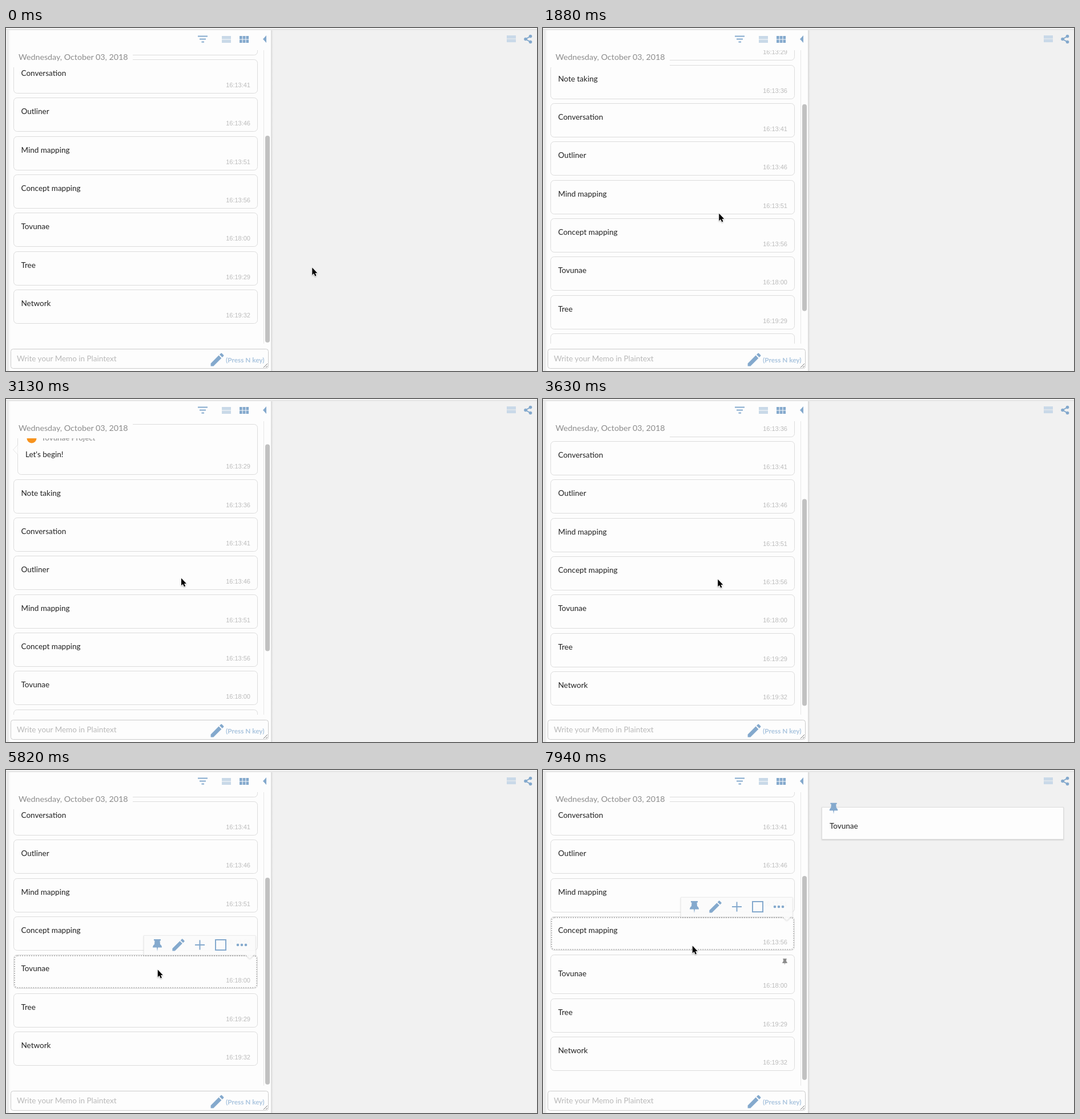
These frames come from a looping animation (930x602 px, 8000 ms). An HTML page:

```html
<!DOCTYPE html>
<html lang="en">
<head>
<meta charset="utf-8">
<title>Note board</title>
<style>
  html, body { margin: 0; width: 100%; height: 100%; overflow: hidden; background: #f1f1f1; }
  svg { display: block; width: 930px; height: 602px; font: 13.5px Lato, sans-serif; fill: #222; }
  .card { fill: #fdfdfd; stroke: #dcdcdc; }
  .time { font: 11px "Liberation Sans", sans-serif; fill: #bbb; text-anchor: end; }
  .blue { fill: #84a9cd; }
  .line { fill: none; stroke: #84a9cd; stroke-width: 2; }
  .pale { fill: #c9d9e8; }
  .date { font-size: 14.25px; fill: #8c8c8c; }
  .name { font-size: 13.2px; font-weight: bold; fill: #a3a3a3; }
  .hint { fill: #b9b9b9; }
  .key { font-size: 11.8px; font-weight: bold; fill: #a9c4de; }
</style>
</head>
<body>
<svg viewBox="0 0 930 602">
  <defs>
    <clipPath id="listClip"><rect x="8" y="39" width="443" height="515"/></clipPath>
    <linearGradient id="edge">
      <stop offset="0" stop-color="#d8d8d8"/><stop offset="1" stop-color="#f1f1f1"/>
    </linearGradient>
    <filter id="soft" x="-20%" y="-20%" width="140%" height="150%">
      <feDropShadow dx="0" dy="1" stdDeviation="1" flood-opacity=".16"/>
    </filter>
    <filter id="drop" x="-50%" y="-50%" width="200%" height="200%">
      <feDropShadow dx="0" dy="1" stdDeviation=".9" flood-opacity=".35"/>
    </filter>
    <path id="pin" d="M-6-10H6V-7.5H4.5L5-1Q8 1 8 4.5H1L0 11L-1 4.5H-8Q-8 1-5-1L-4.5-7.5H-6Z"/>
    <path id="pencil" d="M-9 5.25V9h3.75L5.81-2.06 2.06-5.81ZM8.71-4.96q.7-.7 0-1.41L6.37-8.71q-.7-.7-1.41 0L3.13-6.88 6.88-3.13Z"/>
    <path id="rows" d="M-8-6H8V-.6H-8ZM-8 .6H8V6H-8Z"/>
  </defs>

  <rect width="930" height="602" fill="#f1f1f1"/>
  <rect x="3" y="3" width="461" height="599" fill="#f6f6f6"/>
  <rect x="3" y="3" width="1" height="599" fill="#dedede"/>
  <rect x="7" y="3" width="457" height="599" fill="#fdfdfd"/>
  <rect x="464" y="3" width="4" height="599" fill="url(#edge)"/>
  <rect width="930" height="2" fill="#f8f8f8"/>
  <rect y="2" width="930" height="1" fill="#dcdcdc"/>
  <rect y="3" width="930" height="1" fill="#ebebeb"/>

  <path class="line" d="M336 14.500H353M339 19.500H350M342.500 24.500H347"/>
  <use href="#rows" class="pale" x="386" y="20"/>
  <path class="blue" d="M409 14h4.700v5.400h-4.700zm5.700 0h4.700v5.400h-4.700zm5.700 0h4.700v5.400h-4.700zM409 20.600h4.700v5.400h-4.700zm5.700 0h4.700v5.400h-4.700zm5.700 0h4.700v5.400h-4.700z"/>
  <path class="blue" d="M456 13V26L450 19.500Z"/>
  <use href="#rows" class="pale" x="885" y="19"/>
  <path class="line" stroke-width="1.500" d="M918.500 14.500 910 19.500 918.500 24.500"/>
  <g class="blue"><circle cx="918.500" cy="14.500" r="2.800"/><circle cx="910" cy="19.500" r="2.800"/><circle cx="918.500" cy="24.500" r="2.800"/></g>

  <g clip-path="url(#listClip)">
    <g id="list">
      <rect class="card" x="20.500" y="98.500" width="420" height="88" rx="6"/>
      <path class="card" d="M20.500 134.500 12.500 143 20.500 151.500" stroke-opacity=".7"/>
      <circle cx="45" cy="123" r="8.500" fill="#f7931e"/>
      <text class="name" x="62" y="126.500">Tovunae Project</text>
      <text x="34" y="156">Let's begin!</text>
      <text class="time" x="428" y="176">16:13:29</text>
    </g>
    <g id="date">
      <rect x="8" y="-13" width="214" height="31" fill="#fdfdfd"/>
      <text class="date" x="22" y="5">Wednesday, October 03, 2018</text>
    </g>
    <g id="tools">
      <g filter="url(#soft)">
        <path d="M241.500-33.500H437V.500H434L427 7 420 .500H241.500Z" fill="#fdfdfd" fill-opacity=".9" stroke="#ececec"/>
      </g>
      <use id="toolPin" href="#pin" class="blue" x="265" y="-17"/>
      <use href="#pencil" class="blue" transform="translate(302 -17) scale(1.18)"/>
      <path class="line" d="M331-17H348M339.500-25.500V-8.500M367-26H385V-8H367Z"/>
      <g class="blue"><circle cx="406" cy="-17" r="2.300"/><circle cx="413" cy="-17" r="2.300"/><circle cx="420" cy="-17" r="2.300"/></g>
    </g>
  </g>

  <path d="M451.500 39V554" stroke="#e6e6e6"/>
  <rect id="thumb" x="454" width="8" rx="4" fill="#c1c1c1"/>

  <rect x="8.500" y="563.500" width="451" height="34" rx="4" fill="#fdfdfd" stroke="#cbcbcb"/>
  <text class="hint" x="19" y="584.500">Write your Memo in Plaintext</text>
  <use href="#pencil" class="blue" transform="translate(370 582) scale(1.27)"/>
  <text class="key" x="385" y="587">(Press N key)</text>
  <path d="M451 596 458 589M455 596 458 593" stroke="#777"/>

  <g id="pinned">
    <rect x="488.500" y="65.500" width="423" height="56" fill="#fdfdfd" stroke="#dedede" filter="url(#soft)"/>
    <use href="#pin" class="blue" transform="translate(509 67) scale(.93)"/>
    <text x="502" y="102.500">Tovunae</text>
  </g>

  <g id="cursor" filter="url(#drop)" stroke-linejoin="round">
    <path id="arrow" d="M.3.500V13.400L3.200 10.800 5.300 15.400 7.400 14.500 5.400 10H9.200Z" fill="#000" stroke="#fff" stroke-width="1.200" paint-order="stroke"/>
    <path id="hand" d="M-1.500 9V1.500Q0-.5 1.500 1.500V6Q3 5 4 6.500 5.500 5.500 6.500 7 8.500 6.500 9 8.500V11L7.500 16H-1L-4.500 10.500Q-5-8-1.500 9Z" fill="#fff" stroke="#000"/>
  </g>
</svg>
<script>
const LOOP = 8000, PIN_TIME = 7400, PIN_GROWTH = 9;
const FIRST_TOP = 194.67, PITCH = 67.33;

const notes = [
  ["Note taking", "16:13:36"], ["Conversation", "16:13:41"], ["Outliner", "16:13:46"],
  ["Mind mapping", "16:13:51"], ["Concept mapping", "16:13:56"], ["Tovunae", "16:18:00"],
  ["Tree", "16:19:29"], ["Network", "16:19:32"]
];
const CONCEPT = 4, PINNED = 5;

// Rows are [time, value...], joined linearly.
const scrollKeys = [
  [0, 207], [1270, 207], [1360, 203], [1620, 170], [1880, 130], [2150, 45], [2300, 9],
  [2410, 0], [2620, 0], [2830, 14], [3040, 14], [3340, 145], [3540, 145], [3630, 188],
  [3750, 200], [3990, 207]
];
const cursorKeys = [
  [0, 536, 420], [90, 535, 420], [160, 535, 421], [400, 505, 422], [630, 440, 421],
  [840, 350, 405], [1020, 318, 388], [1270, 315, 370], [1880, 308, 325], [2410, 307, 313],
  [3040, 307, 313], [3340, 306, 316], [3630, 306, 316], [3990, 304, 298], [4400, 304, 298],
  [5120, 272, 295], [5300, 272, 295], [5390, 271, 304], [5560, 268, 332], [5820, 265.5, 350],
  [6000, 265.5, 350], [6260, 264, 324], [6440, 262, 310], [6620, 262, 309], [7160, 262, 309],
  [7250, 261.5, 308]
];
const fadeKeys = [[0, 0], [7310, 0], [7400, .25], [7550, .6], [7790, .9], [7940, 1]];

// Rows are [time, hovered note], held until the next row.
const hoverSteps = [[0, -1], [4490, CONCEPT], [5390, -1], [5500, PINNED], [PIN_TIME, CONCEPT]];

const $ = id => document.getElementById(id);

function make(parent, tag, attrs, text = "") {
  const el = document.createElementNS("http://www.w3.org/2000/svg", tag);
  for (const key in attrs) el.setAttribute(key, attrs[key]);
  el.textContent = text;
  parent.append(el);
  return el;
}

const set = (el, attrs) => { for (const key in attrs) el.setAttribute(key, attrs[key]); };
const move = (el, x, y) => el.setAttribute("transform", `translate(${x} ${y})`);
const show = (el, on) => { el.style.display = on ? "" : "none"; };

function sample(keys, t) {
  const next = keys.findIndex(key => key[0] > t);
  if (next < 0) return keys[keys.length - 1].slice(1);
  const a = keys[next - 1], b = keys[next];
  const part = (t - a[0]) / (b[0] - a[0]);
  return a.slice(1).map((v, i) => v + (b[i + 1] - v) * part);
}

const cards = notes.map(([label, time], i) => {
  const top = Math.round(FIRST_TOP + PITCH * i);
  const group = make($("list"), "g", {});
  const box = make(group, "rect", { class: "card", x: 13.5, y: .5, width: 427, height: 59, rx: 6 });
  const dots = make(group, "rect", {
    x: 15, y: 2, width: 424, height: 56, rx: 5, fill: "none",
    stroke: "#bdbdbd", "stroke-width": 2, "stroke-dasharray": "2 2"
  });
  const body = make(group, "g", {});
  make(body, "text", { x: 26.5, y: 29 }, label);
  make(body, "text", { class: "time", x: 428, y: 49 }, time);
  return { top, group, box, dots, body };
});

const badge = make(cards[PINNED].group, "use", {
  href: "#pin", fill: "#8d8d8d", transform: "translate(423.5 12.5) scale(.54)"
});

function render(t) {
  const [rawScroll] = sample(scrollKeys, t);
  const scroll = Math.round(rawScroll);
  const [x, y] = sample(cursorKeys, t);
  const hovered = hoverSteps.filter(step => step[0] <= t).pop()[1];
  const isPinned = t >= PIN_TIME;
  const growth = isPinned ? PIN_GROWTH : 0;
  const onPin = t >= 6300 && !isPinned;

  move($("list"), 0, -scroll);
  move($("date"), 0, Math.max(77 - scroll, 51));
  cards.forEach((card, i) => {
    move(card.group, 0, card.top + (i > PINNED ? growth : 0));
    show(card.dots, i === hovered);
  });
  set(cards[PINNED].box, { height: 59 + growth });
  move(cards[PINNED].body, 0, growth);
  show(badge, isPinned);

  show($("tools"), hovered >= 0);
  if (hovered >= 0) move($("tools"), 0, cards[hovered].top - scroll);
  $("toolPin").style.fill = onPin ? "#6690b9" : "";

  set($("thumb"), { y: 41 + rawScroll * (isPinned ? .7 : .715), height: isPinned ? 358 : 363 });
  $("pinned").style.opacity = sample(fadeKeys, t)[0];

  move($("cursor"), x, y);
  show($("arrow"), !onPin);
  show($("hand"), onPin);
}

const start = performance.now();
function tick() {
  render((performance.now() - start) % LOOP);
  requestAnimationFrame(tick);
}
tick();
</script>
</body>
</html>
```
